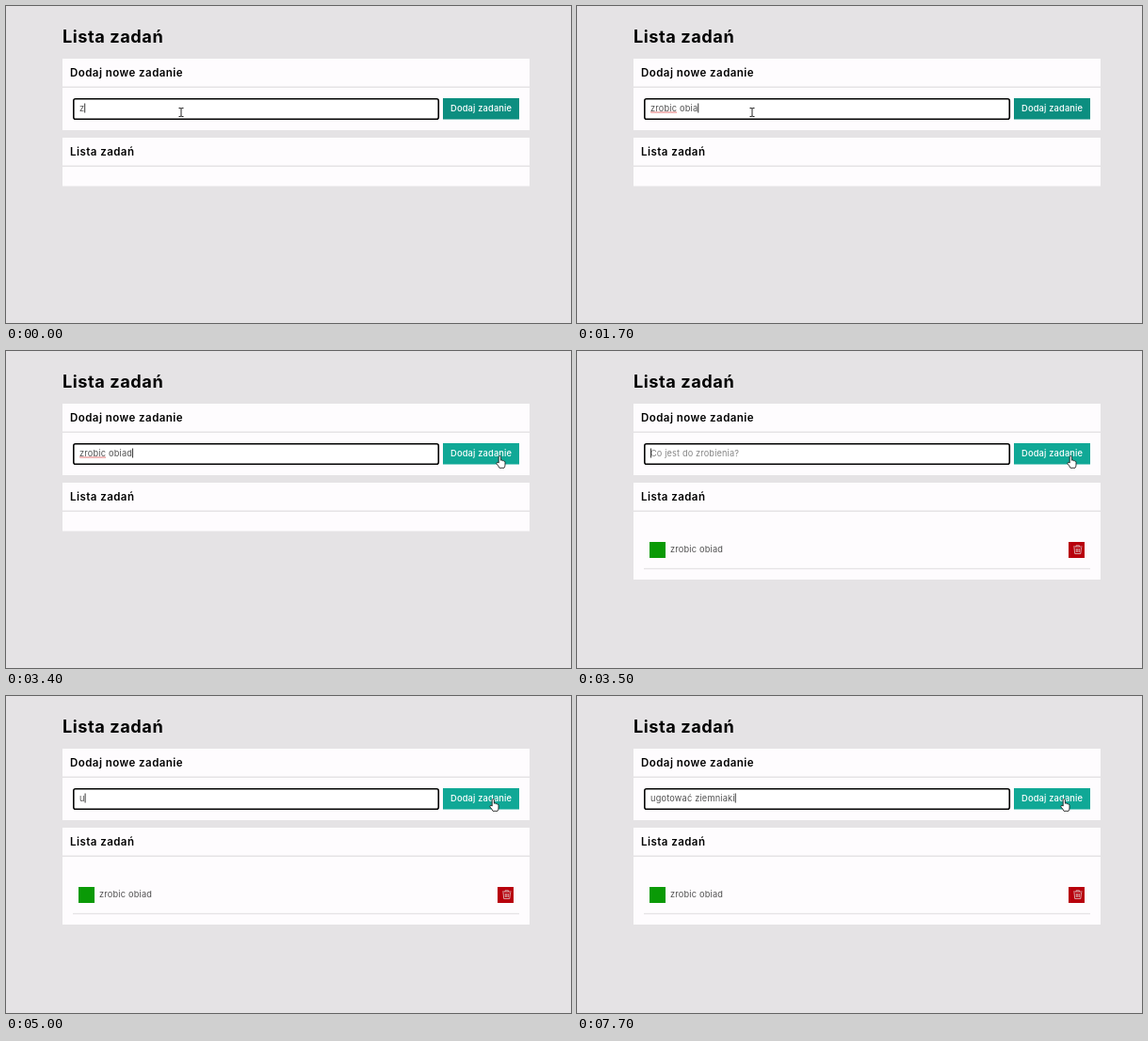
An HTML page with a canvas for the animation above (8 s loop, 600 px wide and 337 px high).

```html
<!DOCTYPE html>
<html lang="pl">
<head>
<meta charset="utf-8">
<style>
  html, body { margin: 0; width: 100%; height: 100%; overflow: hidden; background: #e5e3e5; }
  canvas { display: block; }
</style>
</head>
<body>
<canvas id="stage" width="600" height="337"></canvas>
<script>
const ctx = document.getElementById('stage').getContext('2d');
const LOOP = 8000, ADDED = 3500, SPELLCHECK = 1500;
const GREY = '#e5e3e5', WHITE = '#fefcfe';
const TASK = 'zrobic obiad', NEXT_TASK = 'ugotować ziemniaki', HINT = 'Co jest do zrobienia?';

// [time, typed characters]
const FIRST_KEYS = [[0, 1], [200, 2], [300, 3], [500, 4], [600, 5], [900, 6], [1100, 7],
  [1300, 8], [1400, 9], [1600, 10], [1700, 11], [1900, 12]];
const SECOND_KEYS = [[3500, 0], [4900, 1], [5100, 2], [5200, 3], [5300, 4], [5400, 5], [5500, 6],
  [5900, 7], [6100, 9], [6500, 11], [6600, 12], [7000, 13], [7100, 14], [7200, 15],
  [7400, 16], [7600, 17], [7700, 18]];

// [time, cursor shape, x, y]
const POINTER = [[0, beam, 186, 113], [2500, arrow, 335, 46], [2700, arrow, 440, 38],
  [2800, hand, 505, 100], [2900, hand, 521, 109], [3000, hand, 525, 112],
  [4000, hand, 523, 111], [4100, hand, 520, 110], [4200, hand, 518, 110]];

const STYLES = {
  title: { weight: 700, size: 18.2, spacing: 0.03, color: '#000' },
  heading: { weight: 600, size: 11.5, spacing: 0.04, color: '#000' },
  button: { weight: 500, size: 9.3, spacing: 0.018, color: '#fff' },
  input: { weight: 400, size: 9.2, spacing: 0.022, color: '#505050' },
  hint: { weight: 400, size: 9.2, spacing: 0.015, color: '#858585' }
};

const latest = (steps, t) => steps.filter(step => step[0] <= t).pop();

function rect(x, y, w, h, color) {
  ctx.fillStyle = color;
  ctx.fillRect(x, y, w, h);
}

function setStyle({ weight, size, spacing, color }) {
  ctx.font = `${weight} ${size}px Inter, sans-serif`;
  ctx.letterSpacing = `${size * spacing}px`;
  ctx.fillStyle = color;
}

function text(string, x, y, style) {
  setStyle(STYLES[style]);
  ctx.fillText(string, x, y);
  return ctx.measureText(string).width;
}

function path(d, x, y, fill, stroke, width = 1) {
  const shape = new Path2D(d);
  ctx.save();
  ctx.translate(x, y);
  ctx.lineWidth = width;
  ctx.lineJoin = 'round';
  if (fill) { ctx.fillStyle = fill; ctx.fill(shape); }
  if (stroke) { ctx.strokeStyle = stroke; ctx.stroke(shape); }
  ctx.restore();
}

function beam(x, y) {
  const d = 'M-2.5-4.5H-.8L0-4L.8-4.5H2.5M0-4V4M-2.5 4.5H-.8L0 4L.8 4.5H2.5';
  path(d, x, y, null, '#fff', 2.2);
  path(d, x, y, null, '#222', 1);
}

function arrow(x, y) {
  path('M0 0V10L2.4 7.8L4 11.4L5.6 10.7L4 7.2H7.2Z', x, y, '#fff', '#222', 0.8);
}

function hand(x, y) {
  path('M-1.8 7V.8Q-1.8-.5-.7-.5Q.4-.5.4.8V4.2Q1.7 3.6 2.2 4.6Q3.4 4.2 3.8 5.2Q5 5 5 6.4V9Q5 10.8 4 12.3H-1Q-2.2 9.8-3.8 8.2Q-4.6 7-3.6 6.5Q-2.7 6.2-1.8 7Z',
    x, y, '#fff', '#222', 0.9);
}

function card(y, h, heading) {
  rect(60, y, 496, h, WHITE);
  rect(60, y + 29.5, 496, 1.5, GREY);
  text(heading, 68, y + 18.6, 'heading');
}

function inputField(t) {
  path('M3 0H385.5Q387.5 0 387.5 2V19.5Q387.5 21.5 385.5 21.5H2Q0 21.5 0 19.5V2Q0 0 2 0Z',
    71.8, 98.7, '#fff', '#000', 1.6);
  const first = t < ADDED;
  const [keyTime, count] = latest(first ? FIRST_KEYS : SECOND_KEYS, t);
  const typed = (first ? TASK : NEXT_TASK).slice(0, count);
  const width = text(typed, 78, 111.8, 'input');
  if (!typed) text(HINT, 78, 111.8, 'hint');
  if (first && t >= SPELLCHECK) {
    const end = 78 + ctx.measureText('zrobic').width;
    let wave = 'M78 113.2';
    for (let x = 79, up = true; x < end; x++, up = !up) wave += `L${x} ${up ? 112.6 : 113.5}`;
    path(wave, 0, 0, null, '#dc5555', 0.8);
  }
  const blinkStart = keyTime === 1900 ? 2000 : keyTime;
  const caretOn = t < blinkStart || Math.floor((t - blinkStart) / 500) % 2 === 0;
  if (caretOn) rect(78 + width, 103.5, 0.9, 10, '#222');
}

function taskRow() {
  rect(77, 203, 17, 17, '#0a9a06');
  text(TASK, 99, 214.3, 'input');
  rect(522, 203, 17, 17, '#b8000c');
  path('M527 208H536.5M530 208V206.8H533.5V208M528 209L528.7 215.5H534.8L535.5 209M530.3 210V214M531.8 210V214M533.3 210V214',
    0, 0, null, '#dcb4b4', 0.9);
  rect(71, 230.8, 474, 1.3, GREY);
}

function draw(now) {
  const t = Math.floor(now % LOOP / 100) * 100;
  rect(0, 0, 600, 337, GREY);
  text('Lista zadań', 60, 39, 'title');
  card(56, 76, 'Dodaj nowe zadanie');
  inputField(t);
  rect(464, 98, 81, 22.5, t < 2800 ? '#0c8e80' : t < 2900 ? '#0e9b8b' : '#10a896');
  text('Dodaj zadanie', 472, 111.8, 'button');
  card(140, t < ADDED ? 51.5 : 103, 'Lista zadań');
  if (t >= ADDED) taskRow();
  const [, cursor, x, y] = latest(POINTER, t);
  cursor(x, y);
  requestAnimationFrame(() => draw(performance.now()));
}

draw(performance.now());
</script>
</body>
</html>
```
